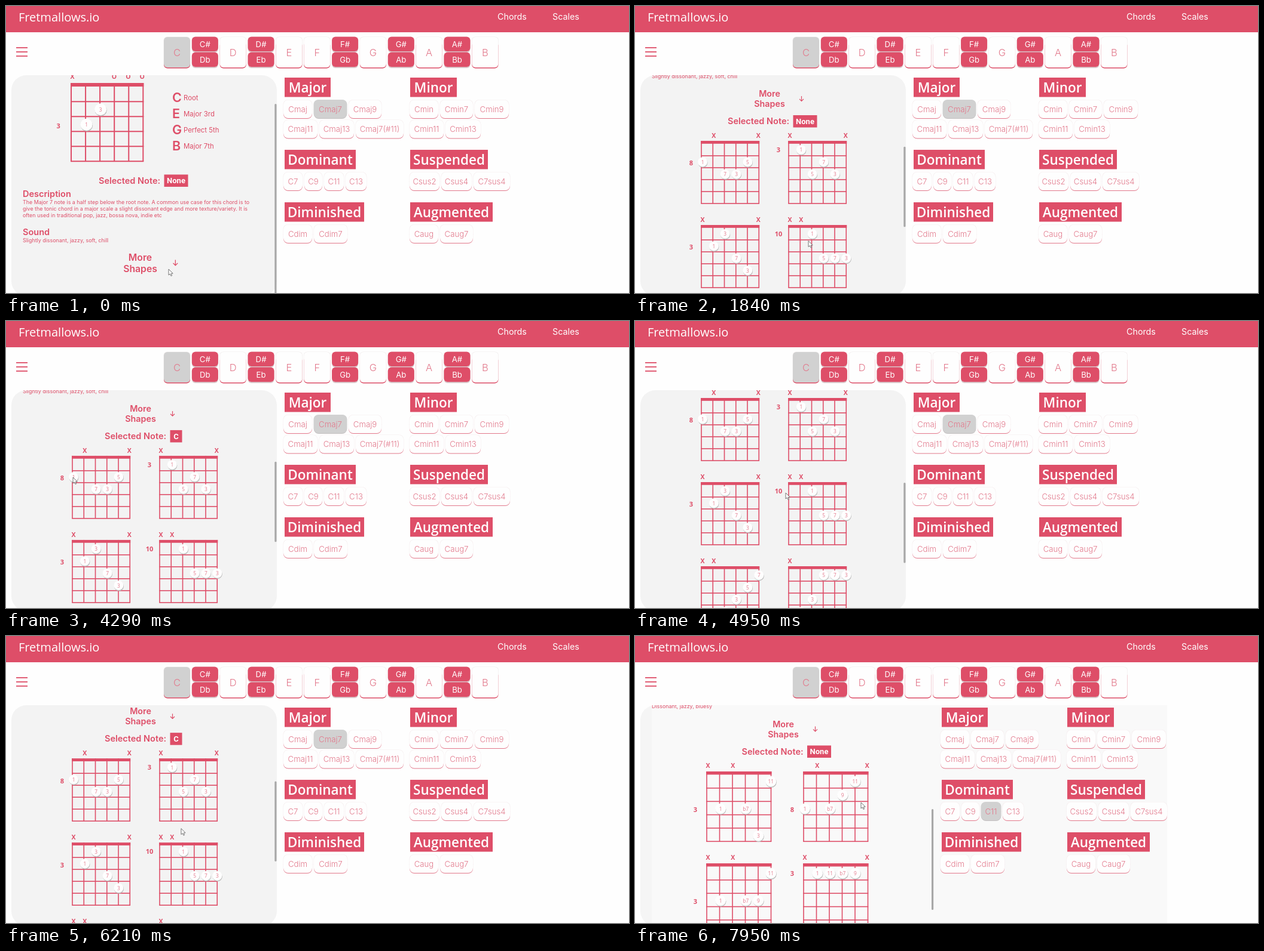
Animation, 1042 px wide and 481 px high, one loop 8 s. Source, as an HTML page with a canvas:

```html
<!DOCTYPE html>
<html lang="en">
<head>
<meta charset="utf-8">
<title>Chord explorer</title>
<style>
html, body { margin: 0; width: 100%; height: 100%; overflow: hidden; background: #fefefe; }
canvas { display: block; }
</style>
</head>
<body>
<canvas id="stage" width="1042" height="481"></canvas>
<script>
const ctx = document.getElementById('stage').getContext('2d');
const LOOP = 8000, CUT = 7650;
const PINK = '#de4e68', SOFT = '#e2788b', GREY = '#d1d1d1';
const BODY = 'Inter, sans-serif';
const HEAD = '"Open Sans", "Noto Sans", sans-serif';
const VIEW = { x: 9, y: 116, h: 370 };

const clamp = v => Math.max(0, Math.min(1, v));
const smooth = v => { v = clamp(v); return v * v * (3 - 2 * v); };
const mix = (a, b, p) => a + (b - a) * p;

// Keys are [time, ...values]; returns the values at time t.
function track(keys, t, ease) {
  let i = 0;
  while (i < keys.length - 2 && t >= keys[i + 1][0]) i++;
  const [a, b] = [keys[i], keys[i + 1]];
  const p = ease(clamp((t - a[0]) / (b[0] - a[0])));
  return a.slice(1).map((v, k) => mix(v, b[k + 1], p));
}

const SCROLL = [
  [0, 55], [870, 55], [990, 150], [1300, 262], [1620, 330], [4290, 330], [4560, 352],
  [4950, 427], [5130, 427], [5850, 488], [5970, 492], [6810, 0], [8000, 0]
];
const POINTER = [
  [0, 272, 441], [120, 272, 441], [810, 251, 306], [990, 251, 306], [1620, 350, 438],
  [1700, 350, 438], [2130, 112, 262], [2220, 112, 262], [2380, 171, 287], [2500, 171, 287],
  [2620, 172, 288], [2800, 172, 288], [3050, 168, 282], [3290, 168, 282], [3630, 150, 281],
  [3810, 150, 281], [4080, 112, 262], [4290, 112, 262], [4900, 252, 288], [5130, 252, 288],
  [5850, 290, 330], [5970, 290, 330], [6850, 306, 290], [7000, 306, 290], [7560, 548, 292],
  [7649, 548, 292], [7650, 470, 292], [7930, 378, 279], [8000, 378, 279]
];

// y is the middle of the capital letters.
function text(str, x, y, size, { weight = 400, color = PINK, font = BODY, align = 'left' } = {}) {
  ctx.font = `${weight} ${size}px ${font}`;
  ctx.fillStyle = color;
  ctx.textAlign = align;
  ctx.fillText(str, x, y + size * 0.36);
}
function rect(x, y, w, h, color) {
  ctx.fillStyle = color;
  ctx.fillRect(x, y, w, h);
}
function round(x, y, w, h, r, color) {
  ctx.fillStyle = color;
  ctx.beginPath();
  ctx.roundRect(x, y, w, h, r);
  ctx.fill();
}
function disc(x, y, r, color) {
  ctx.fillStyle = color;
  ctx.beginPath();
  ctx.arc(x, y, r, 0, 7);
  ctx.fill();
}

function header() {
  rect(0, 0, 1042, 44, PINK);
  text('Fretmallows.io', 21, 19, 20, { color: '#fff', font: HEAD, weight: 500 });
  text('Chords', 822, 18, 14.3, { color: '#fff' });
  text('Scales', 914, 18, 14.3, { color: '#fff' });
  for (const y of [69, 76, 83]) rect(17, y, 19, 1.8, PINK);
}

function keyboard() {
  const notes = ['C', 'C# Db', 'D', 'D# Eb', 'E', 'F', 'F# Gb', 'G', 'G# Ab', 'A', 'A# Bb', 'B'];
  notes.forEach((note, i) => {
    const x = 264 + 46.85 * i, pair = note.split(' ');
    if (pair.length > 1) {
      pair.forEach((name, k) => {
        round(x, 52 + 26 * k, 44, 26, 6, '#d9c5c9');
        round(x, 51.5 + 26 * k, 44, 24.5, 6, PINK);
        text(name, x + 22, 64.5 + 25.5 * k, 13.2, { color: '#fff', align: 'center' });
      });
      return;
    }
    round(x - 0.5, 51.5, 45, 53, 6, '#f1eded');
    round(x, 60, 44, 44.5, 6, PINK);
    round(x, 52, 44, 51, 6, i ? '#fefefe' : GREY);
    text(note, x + 22, 78, 16.5, { weight: 300, color: SOFT, align: 'center' });
  });
}

const GROUPS = [
  ['Major', 466, 120, 77, [['Cmaj', 48], ['Cmaj7', 55], ['Cmaj9', 55]], [['Cmaj11', 57], ['Cmaj13', 58], ['Cmaj7(#11)', 80]]],
  ['Minor', 676, 120, 78, [['Cmin', 48], ['Cmin7', 55], ['Cmin9', 57]], [['Cmin11', 57], ['Cmin13', 59]]],
  ['Dominant', 466, 241, 119, [['C7', 32], ['C9', 30], ['C11', 33], ['C13', 35]]],
  ['Suspended', 676, 241, 130, [['Csus2', 50], ['Csus4', 51], ['C7sus4', 61]]],
  ['Diminished', 466, 329, 133, [['Cdim', 48], ['Cdim7', 56]]],
  ['Augmented', 676, 329, 138, [['Caug', 48], ['Caug7', 55]]]
];
function chordList(shift, active) {
  for (const [name, left, top, width, ...rows] of GROUPS) {
    rect(left + shift, top, width, 32.5, PINK);
    text(name, left + shift + width / 2, top + 16.5, 22.5, { weight: 600, color: '#fff', font: HEAD, align: 'center' });
    rows.forEach((row, k) => {
      let x = left + shift - 2 + (left > 600 ? 1 : 0);
      const y = top + 37.5 + 33.5 * k;
      for (const [chord, w] of row) {
        const on = chord === active;
        round(x - 0.5, y - 0.5, w + 1, 31, 8, on ? GREY : '#f6eeef');
        round(x, y + 8, w, 23.5, 8, on ? '#c3bfc0' : SOFT);
        round(x, y, w, 30.5, 8, on ? GREY : '#fefefe');
        text(chord, x + w / 2, y + 15.5, 13.2, { weight: 300, color: SOFT, align: 'center' });
        x += w + 3;
      }
    });
  }
}

// Marks are string numbers; each dot is "label:string+row".
function board(x, y, s, { muted = '', open = '', fret, dots }) {
  const dx = 19.25 * s, dy = 20 * s, first = 25 * s;
  const bottom = y + first + 4 * dy;
  const line = s > 1.2 ? 2 : 1.6;
  const rowY = r => y + 15 * s + 20.4 * s * (r - 1);
  const small = { weight: 700, font: HEAD, align: 'center' };
  for (let i = 0; i < 6; i++) {
    rect(x + i * dx - line / 2, y, line, bottom - y, PINK);
    if (i < 5) rect(x - line / 2, y + first + i * dy - line / 2, 5 * dx + line, line, PINK);
  }
  rect(x - 1, y, 5 * dx + 2, 4.8 * s, PINK);
  for (const n of muted) text('X', x + 2 + (n - 1) * dx * 0.97, y - 9 * s, 10.5, small);
  for (const n of open) text('O', x + 2 + (n - 1) * dx * 0.97, y - 9 * s, 10.5, small);
  text(fret[0], x - 17 * s, rowY(fret[1]) + (fret[1] > 1 ? 2 : 0), 11, small);
  for (const dot of dots.split(' ')) {
    const [label, at] = dot.split(':');
    const cx = x + 2 + (at[0] - 1) * dx * 0.98, cy = rowY(+at[1]);
    disc(cx + 0.5, cy + 1.4, 8 * s, '#bdbdbd');
    disc(cx, cy, 8 * s, '#fefefe');
    text(label, cx, cy + 0.5, 8.3, { font: HEAD, color: SOFT, align: 'center' });
  }
}

const MAIN = { muted: '1', open: '456', fret: [3, 3], dots: '3:32 1:23' };
const SHAPES = [
  { muted: '26', fret: [8, 2], dots: '1:12 5:52 7:33 3:43' },
  { muted: '16', fret: [3, 1], dots: '1:21 7:42 5:33 3:53' },
  { muted: '16', fret: [3, 2], dots: '3:31 1:22 7:43 3:54' },
  { muted: '12', fret: [10, 1], dots: '1:31 5:43 7:53 3:63' },
  { muted: '12', fret: [10, 4], dots: '7:61 5:52 3:43 1:34' },
  { muted: '1', fret: [3, 4], dots: '5:41 7:51 3:61 3:33 1:24' }
];
const ELEVENTH = [
  { muted: '13', fret: [3, 3], dots: '11:61 1:23 b7:43 3:55' },
  { muted: '26', fret: [8, 3], dots: '11:51 9:42 1:13 b7:33' },
  { muted: '13', fret: [3, 3], dots: '11:61 1:23 b7:43 9:53' },
  { muted: '16', fret: [3, 1], dots: '1:21 11:31 b7:41 9:51' }
];

function selectedNote(mid, y, note) {
  const w = note === 'None' ? 40 : 20, left = mid - (110 + w) / 2;
  text('Selected Note:', left, y, 14.5, { weight: 600 });
  rect(left + 109.5, y - 10, w, 20.5, PINK);
  text(note, left + 109.5 + w / 2, y, 13, { weight: 700, color: '#fff', font: 'Roboto, sans-serif', align: 'center' });
}

function moreShapes(mid, y, scale) {
  ctx.save();
  ctx.translate(mid, y);
  ctx.scale(scale, scale);
  text('More', -5, -8, 14.3, { weight: 600, align: 'center' });
  text('Shapes', -5, 9, 14.3, { weight: 600, align: 'center' });
  ctx.strokeStyle = PINK;
  ctx.lineWidth = 1.2;
  ctx.beginPath();
  ctx.moveTo(48.5, -4);
  ctx.lineTo(48.5, 4);
  ctx.moveTo(45, 0.8);
  ctx.lineTo(48.5, 4.3);
  ctx.lineTo(52, 0.8);
  ctx.stroke();
  ctx.restore();
}

function seventhPage(t, note, opened) {
  text('Major 7th Chord', 230, 151, 23.4, { weight: 600, align: 'center' });
  board(109, 184, 1.25, MAIN);
  [['C', 'Root'], ['E', 'Major 3rd'], ['G', 'Perfect 5th'], ['B', 'Major 7th']].forEach(([n, name], i) => {
    text(n, 278, 208.5 + 27 * i, 21.5, { weight: 600 });
    text(name, 297, 208.5 + 27 * i, 11.4);
  });
  selectedNote(230, 347.5, note);
  text('Description', 28, 369.5, 14.5, { weight: 600 });
  ['The Major 7 note is a half step below the root note. A common use case for this chord is to',
   'give the tonic chord in a major scale a slight dissonant edge and more texture/variety. It is',
   'often used in traditional pop, jazz, bossa nova, indie etc'
  ].forEach((line, i) => text(line, 28, 383.5 + 11 * i, 8.9));
  text('Sound', 28, 434, 14.5, { weight: 600 });
  text('Slightly dissonant, jazzy, soft, chill', 28, 448, 8.9);
  moreShapes(230, 485, mix(1.1, 1, smooth((t - 150) / 200)));
  ctx.globalAlpha = opened;
  selectedNote(230, 523, note);
  SHAPES.forEach((shape, i) => board(111 + 146 * (i % 2), 556 + 141 * (i >> 1), 1, shape));
  for (const x of [186, 205]) text('X', x, 970, 10.5, { weight: 700, font: HEAD, align: 'center' });
  ctx.globalAlpha = 1;
}

function eleventhPage() {
  text('Dissonant, jazzy, bluesy', 28, 118, 8.9);
  moreShapes(253, 155.5, 1);
  selectedNote(253.5, 193.5, 'None');
  ELEVENTH.forEach((shape, i) => board(120 + 162 * (i % 2), 227 + 154 * (i >> 1), 1.117, shape));
}

function clipPanel(width) {
  ctx.beginPath();
  ctx.roundRect(VIEW.x, VIEW.y, width, VIEW.h, 25);
  ctx.clip();
}
function scrollbar(x, scroll, content) {
  const k = VIEW.h / content;
  round(x, VIEW.y + scroll * k, 3.2, VIEW.h * k, 1.5, '#a8a8a8');
}

function noteAt(t) {
  if (t < 2190) return 'None';
  if (t < 2990) return 'C';
  if (t < 3870) return 'E';
  return t < 4110 ? 'B' : 'C';
}

function arrow(x, y) {
  ctx.beginPath();
  [[0, 0], [0, 10], [2.3, 8], [4, 11.5], [5.6, 10.8], [4.1, 7.4], [7.2, 7.2]]
    .forEach(([dx, dy]) => ctx.lineTo(x + dx, y + dy));
  ctx.closePath();
  ctx.fillStyle = '#fff';
  ctx.fill();
  ctx.strokeStyle = '#666';
  ctx.lineWidth = 0.9;
  ctx.stroke();
}
function beam(x, y) {
  rect(x - 0.5, y - 4, 1, 8, '#555');
  rect(x - 2, y - 4.5, 4, 1, '#555');
  rect(x - 2, y + 3.5, 4, 1, '#555');
}

function draw(t) {
  rect(0, 0, 1042, 481, '#fefefe');
  header();
  keyboard();
  ctx.save();
  if (t < CUT) {
    const [scroll] = track(SCROLL, t, v => v);
    const opened = smooth((t - 60) / 400);
    clipPanel(444);
    rect(9, 116, 444, 370, '#f3f3f3');
    ctx.translate(0, -scroll);
    seventhPage(t, noteAt(t), opened);
    ctx.restore();
    scrollbar(449.3, scroll, mix(425, 1019, opened));
    chordList(0, 'Cmaj7');
  } else {
    clipPanel(490);
    rect(9, 116, 490, 370, '#f5f5f5');
    ctx.restore();
    rect(28, 116, 862, 365, '#f9f9f9');
    ctx.save();
    ctx.beginPath();
    ctx.rect(9, 116, 490, 365);
    ctx.clip();
    eleventhPage();
    ctx.restore();
    scrollbar(496, 381, 810);
    chordList(47, 'C11');
  }
  const [x, y] = track(POINTER, t, smooth);
  const overText = t > 6700 && t < CUT && x > 298 && x < 350;
  (overText ? beam : arrow)(x, y);
}

function frame() {
  draw(performance.now() % LOOP);
  requestAnimationFrame(frame);
}
frame();
</script>
</body>
</html>
```
